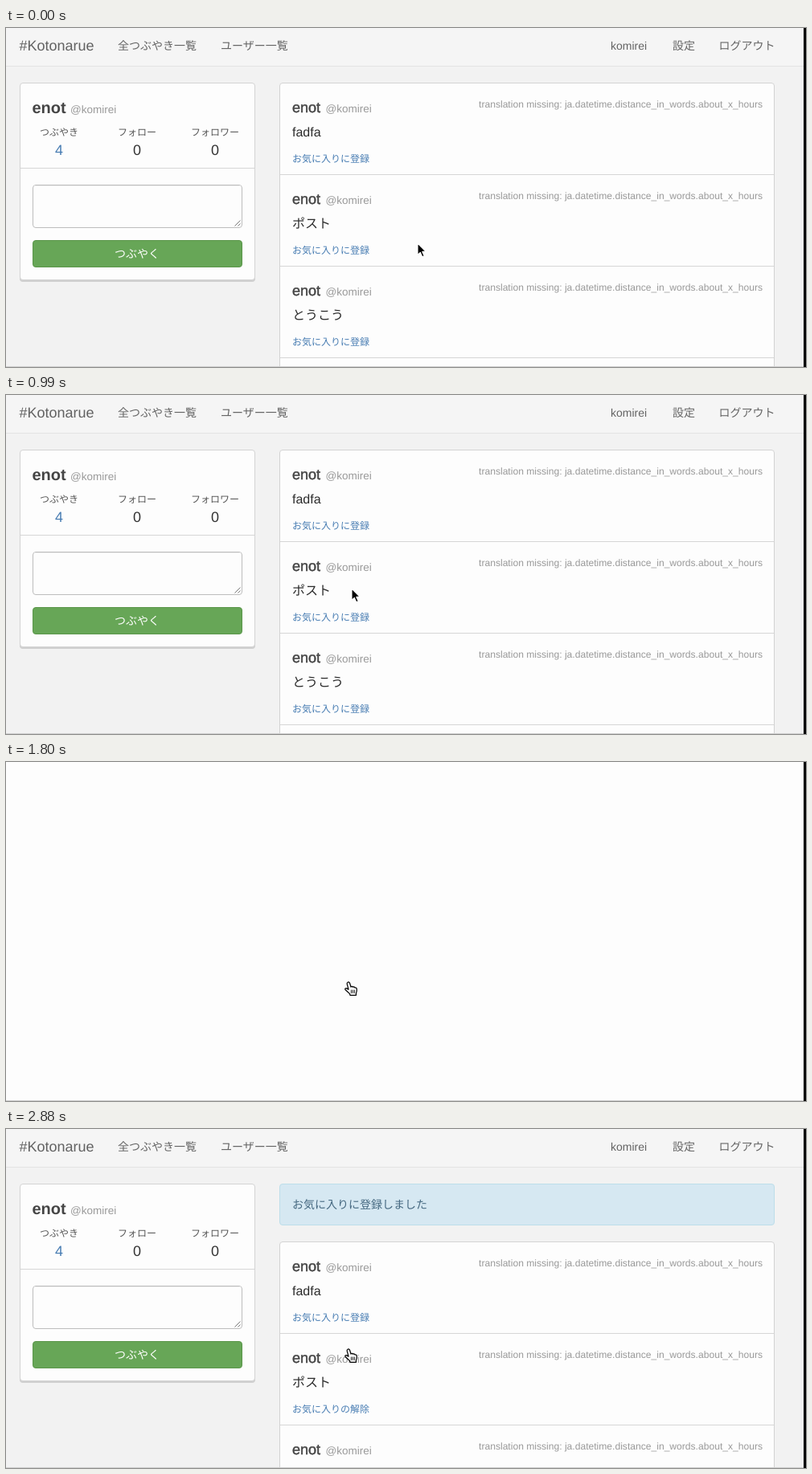
An HTML page that plays this animation: 995 by 422 pixels, repeating every 2970 ms.

```html
<!DOCTYPE html>
<html lang="ja">
<head>
<meta charset="utf-8">
<title>つぶやき</title>
<style>
  html, body { margin: 0; width: 100%; height: 100%; overflow: hidden; background: #f2f2f2; }
  svg { display: block; }
  text {
    font-family: "Liberation Sans", "Noto Sans CJK JP", "Noto Sans CJK", sans-serif;
    text-rendering: geometricPrecision;
    white-space: pre;
  }
  .nav { font-size: 14px; fill: #646464; }
  .brand { font-size: 18px; fill: #626262; }
  .owner { font-size: 20px; font-weight: bold; fill: #444; }
  .name { font-size: 18px; fill: #444; stroke: #444; stroke-width: .5px; }
  .handle { font-size: 13.5px; fill: #999; }
  .label { font-size: 12px; fill: #555; }
  .count { font-size: 18px; fill: #333; }
  .body { font-size: 16px; fill: #2c2c2c; }
  .date { font-size: 12.1px; fill: #999; }
  .link { font-size: 12px; font-weight: 500; fill: #477cb2; }
  .link.hover { fill: #2c4c70; }
  .blue { fill: #477cb2; }
  .submit { font-size: 14px; font-weight: 500; fill: #fff; }
  .notice { font-size: 14px; fill: #456880; }
  .box { fill: #fdfdfd; stroke: #d3d3d3; }
  .rule { stroke: #d6d6d6; }
</style>
</head>
<body>
<svg id="stage" width="995" height="422" viewBox="0 0 995 422"></svg>
<script>
const NS = "http://www.w3.org/2000/svg";
const stage = document.getElementById("stage");
const LOOP = 2970, STEP = 90;
const BLANK_AT = 1800, RELOAD_AT = 2070, HOVER_AT = 1170;
const NAME = "enot", HANDLE = "komirei";

function add(parent, tag, attrs = {}, content = "") {
  const el = document.createElementNS(NS, tag);
  for (const key in attrs) el.setAttribute(key, attrs[key]);
  if (content) el.textContent = content;
  parent.appendChild(el);
  return el;
}
const label = (parent, cls, x, y, content, anchor = "start") =>
  add(parent, "text", { class: cls, x, y, "text-anchor": anchor }, content);
const rect = (parent, x, y, width, height, attrs) =>
  add(parent, "rect", { x, y, width, height, ...attrs });
const rule = (parent, x1, x2, y) =>
  add(parent, "line", { class: "rule", x1, x2, y1: y, y2: y });

rect(stage, 0, 0, 995, 422, { fill: "#fdfdfd" });
const page = add(stage, "g");

function drawNav() {
  rect(page, 0, 0, 995, 422, { fill: "#f2f2f2" });
  rect(page, 0, 0, 995, 47, { fill: "#f5f5f5" });
  rect(page, 0, 47, 995, 1, { fill: "#e3e3e3" });
  label(page, "brand", 16.5, 28, "#Kotonarue");
  label(page, "nav", 139, 26.8, "全つぶやき一覧");
  label(page, "nav", 267, 26.8, "ユーザー一覧");
  label(page, "nav", 752, 27, HANDLE);
  label(page, "nav", 829, 26.8, "設定");
  label(page, "nav", 886.5, 26.8, "ログアウト");
}

function drawProfile() {
  rect(page, 17, 70, 293, 246, { rx: 4, fill: "#cfcfcf" });
  rect(page, 17.5, 68.5, 292, 245, { rx: 3.5, class: "box" });
  label(page, "owner", 32.5, 106, NAME);
  label(page, "handle", 80, 105.5, "@" + HANDLE);
  [["つぶやき", 4], ["フォロー", 0], ["フォロワー", 0]].forEach(([title, n], i) => {
    const x = 66 + 97 * i;
    label(page, "label", x, 133.5, title, "middle");
    const count = label(page, "count", x, 158, String(n), "middle");
    if (n) count.style.fill = "#477cb2";
  });
  rule(page, 18, 309, 174.5);
  rect(page, 33.5, 195.5, 260, 53, { rx: 3.5, fill: "#fdfdfd", stroke: "#bdbdbd" });
  rect(page, 35, 196, 257, 1, { fill: "#ececec" });
  add(page, "path", { d: "M284.5 246.5l7-7M288.5 246.5l3-3", stroke: "#777", fill: "none" });
  rect(page, 33.5, 264.5, 260, 33, { rx: 3.5, fill: "#67a657", stroke: "#5a964a" });
  label(page, "submit", 163, 286, "つぶやく", "middle");
}

function drawFeed() {
  const feed = add(page, "g");
  rect(feed, 340.5, 68.5, 615, 480, { rx: 3.5, class: "box" });
  const links = ["fadfa", "ポスト", "とうこう"].map((post, i) => {
    const item = add(feed, "g", { transform: `translate(0 ${114 * i})` });
    label(item, "name", 356, 105, NAME);
    label(item, "handle", 397.5, 105, "@" + HANDLE);
    label(item, "date", 941, 99,
      "translation missing: ja.datetime.distance_in_words.about_x_hours", "end");
    label(item, "body", 356, i ? 134.8 : 135, post);
    const link = label(item, "link", 356, 166.6, "お気に入りに登録");
    rule(item, 341, 955, 182.5);
    return link;
  });
  return { feed, link: links[1] };
}

function drawNotice() {
  const notice = add(page, "g");
  rect(notice, 340.5, 68.5, 615, 51, { rx: 3.5, fill: "#d6e8f2", stroke: "#bcdeea" });
  label(notice, "notice", 356, 98.8, "お気に入りに登録しました");
  return notice;
}

drawNav();
drawProfile();
const { feed, link } = drawFeed();
const notice = drawNotice();
const underline = rect(page, 356, 282, 96, 1, { fill: "#2c4c70" });
rect(stage, 0, 421, 992, 1, { fill: "#cfcfcf" });
rect(stage, 992, 0, 3, 422, { fill: "#000" });

// Each pointer is drawn around its hot spot.
const pointer = add(stage, "g", { "stroke-linejoin": "round", "stroke-linecap": "round" });
const shapes = {
  arrow: add(pointer, "g"),
  beam: add(pointer, "g"),
  hand: add(pointer, "g", { transform: "translate(-5 -1)" })
};
add(shapes.arrow, "path", {
  d: "M0 0V14.4L3.3 11.3L5.7 16.8L8.2 15.7L5.8 10.4H10.2Z",
  fill: "#000", stroke: "#fff", "stroke-width": 1.1
});
const beam = "M-3 -7.5Q0 -7.5 0 -5.5Q0 -7.5 3 -7.5M0 -5.5V5.5M-3 7.5Q0 7.5 0 5.5Q0 7.5 3 7.5M-1.5 2.5H1.5";
[["#fff", 2.6], ["#222", 1.1]].forEach(([stroke, width]) =>
  add(shapes.beam, "path", { d: beam, fill: "none", stroke, "stroke-width": width }));
add(shapes.hand, "path", {
  d: "M4 1.3C5 .6 6.2 1.2 6.6 2.4L8 7C8.6 6.2 10 6.3 10.4 7.2C11.2 6.6 12.4 6.9 12.8 7.9" +
     "C13.8 7.5 15 8.2 15.2 9.4C15.6 11.6 15.2 13.4 14.4 15V17.3H7L6.6 15.6" +
     "C4.6 13.6 2.8 11.8 1 10.4C.2 9.4 1.4 8.3 2.8 8.9L5 10.2L3.2 3.4C3 2.5 3.3 1.7 4 1.3Z",
  fill: "#fff", stroke: "#000", "stroke-width": 1.25
});
add(shapes.hand, "path", { d: "M8.4 11V14.5M10.4 11V14.5M12.4 11V14.5", stroke: "#000", "stroke-width": .9 });

// time, x, y
const route = [
  [540, 512, 268], [630, 505, 261], [720, 469, 236], [810, 435, 220],
  [900, 431, 224], [1080, 429, 258], [1170, 426, 272], [1260, 426, 274]
];

function along(t) {
  const next = route.findIndex(p => p[0] > t);
  if (next === 0) return route[0].slice(1);
  if (next < 0) return route[route.length - 1].slice(1);
  const a = route[next - 1], b = route[next];
  const k = (t - a[0]) / (b[0] - a[0]);
  return [1, 2].map(i => a[i] + (b[i] - a[i]) * k);
}

function pointerKind(t) {
  if (t >= HOVER_AT) return "hand";
  return t >= 810 && t < 990 ? "beam" : "arrow";
}

const show = (el, on) => el.setAttribute("visibility", on ? "inherit" : "hidden");

function render(ms) {
  const t = Math.floor(ms % LOOP / STEP) * STEP;
  const saved = t >= RELOAD_AT;
  const hover = t >= HOVER_AT && t < BLANK_AT;

  page.style.display = t >= BLANK_AT && !saved ? "none" : "";
  feed.setAttribute("transform", `translate(0 ${saved ? 72 : 0})`);
  show(notice, saved);
  show(underline, hover);
  link.setAttribute("class", hover ? "link hover" : "link");
  link.textContent = saved ? "お気に入りの解除" : "お気に入りに登録";

  pointer.setAttribute("transform", `translate(${along(t)})`);
  const kind = pointerKind(t);
  for (const key in shapes) show(shapes[key], key === kind);
}

const start = performance.now();
function tick() {
  render(performance.now() - start);
  requestAnimationFrame(tick);
}
tick();
</script>
</body>
</html>
```
